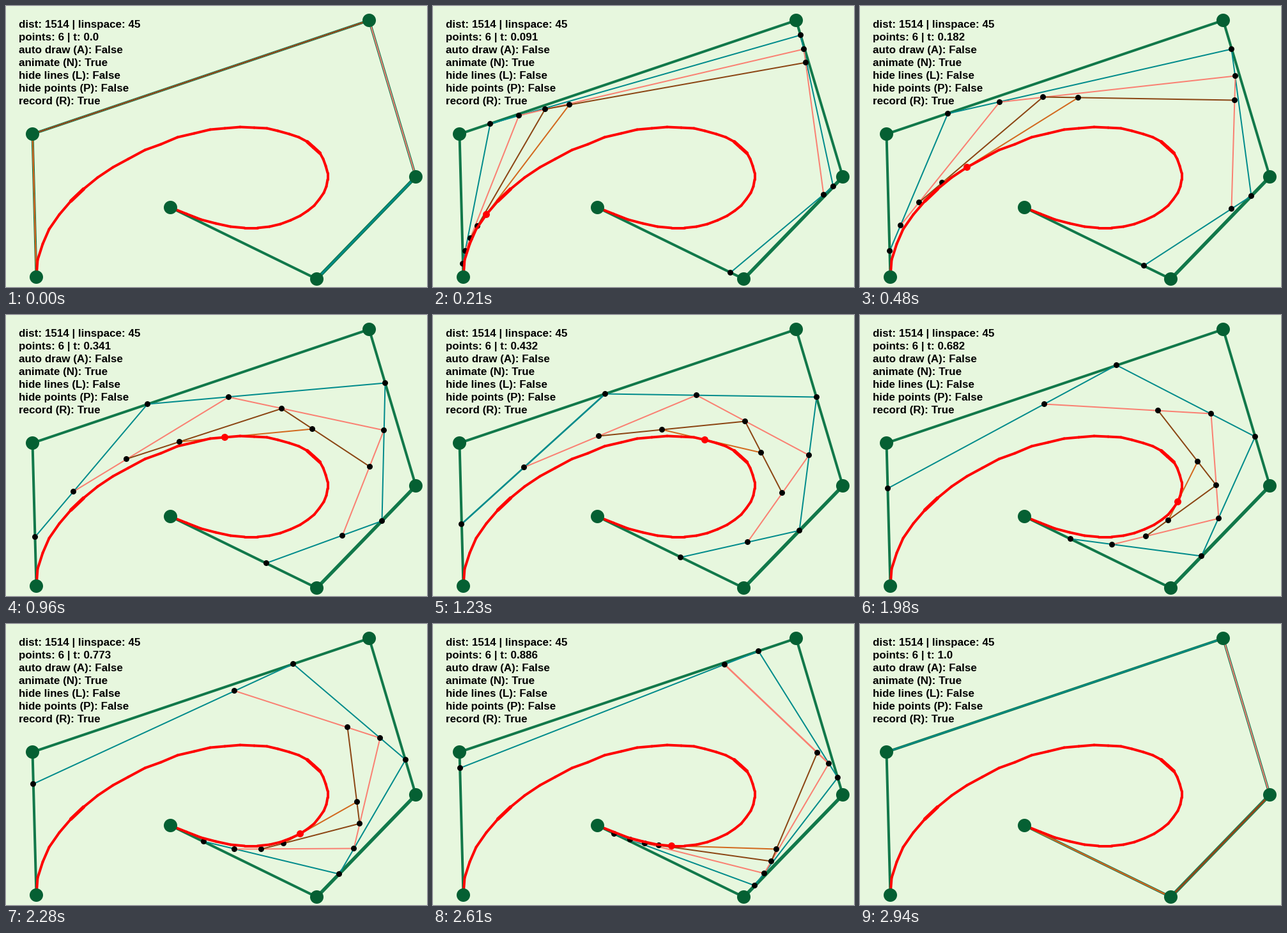
Animation of 659x440 px, one loop 3.03 s. Source, as a matplotlib script:

```python
import matplotlib.pyplot as plt
from matplotlib.animation import FuncAnimation
from matplotlib.collections import LineCollection
from matplotlib.patches import Circle

W, H, DPI = 659, 440, 64
PX = 72 / DPI                      # one pixel in points
STEPS = 44
TICKS, TICK_MS = 101, 30

BACK = "#e7f7de"
FRAME_GREEN = "#11784a"
DOT_GREEN = "#056033"
LEVEL_COLORS = ["darkcyan", "salmon", "saddlebrown", "chocolate"]

CONTROL = [(47, 424), (41, 200), (568, 22), (641, 267), (486, 427), (257, 315)]

INFO = """dist: 1514 | linspace: 45
points: 6 | t: {}
auto draw (A): False
animate (N): True
hide lines (L): False
hide points (P): False
record (R): True"""


def along(p, q, k):
    """Pixel on the raster line p-q at k / STEPS of its length."""
    dx, dy = q[0] - p[0], q[1] - p[1]
    n = max(abs(dx), abs(dy))
    if n == 0:
        return p
    i = -(-k * n // STEPS)
    return tuple((2 * (a * n + i * d) + n) // (2 * n) for a, d in zip(p, (dx, dy)))


def casteljau(k):
    """Points of every construction level, ending with the curve point."""
    levels, pts = [], CONTROL
    while len(pts) > 1:
        pts = [along(p, q, k) for p, q in zip(pts, pts[1:])]
        levels.append(pts)
    return levels


def trace(lines, pts, width):
    """Lay a polyline; near-diagonal pieces come out heavier."""
    segs = list(zip(pts, pts[1:]))
    widths = []
    for (x0, y0), (x1, y1) in segs:
        lo, hi = sorted((abs(x1 - x0), abs(y1 - y0)))
        widths.append(width * PX * (1.35 if lo > 0.88 * hi else 1))
    lines.set_segments(segs)
    lines.set_linewidths(widths)


def stroke(color, z, pts=(), width=4):
    lines = LineCollection([], colors=color, capstyle="round", zorder=z)
    ax.add_collection(lines)
    trace(lines, pts, width)
    return lines


def dot(center, color, size, z):
    return ax.add_patch(Circle(center, size / 2, color=color, lw=0, zorder=z))


fig = plt.figure(figsize=(W / DPI, H / DPI), dpi=DPI, facecolor=BACK)
ax = fig.add_axes([0, 0, 1, 1])
ax.axis("off")
ax.set_autoscale_on(False)
ax.set_xlim(-0.5, W - 0.5)
ax.set_ylim(H - 0.5, -0.5)

curve = [casteljau(k)[-1][0] for k in range(STEPS + 1)]

stroke(FRAME_GREEN, 1, CONTROL)
level_lines = [stroke(c, 2 + 0.1 * i) for i, c in enumerate(LEVEL_COLORS)]
joints = [dot(p, "black", 9, 3) for level in casteljau(0)[:-1] for p in level]
stroke("red", 4, curve)
tracer = dot(curve[0], "red", 11, 5)
for point in CONTROL:
    dot(point, DOT_GREEN, 21, 6)
rows = [ax.text(20, 33.1 + 20 * i, "", family="Liberation Sans", weight="bold",
                size=17.05 * PX, color="black", va="baseline", zorder=7)
        for i in range(INFO.count("\n") + 1)]


def draw(tick):
    k = -(-11 * tick // 25)
    levels = casteljau(k)
    for lines, pts in zip(level_lines, levels):
        trace(lines, pts, 2)
    for patch, p in zip([*joints, tracer], sum(levels, [])):
        patch.center = p
    for row, label in zip(rows, INFO.format(round(k / STEPS, 3)).split("\n")):
        row.set_text(label)
    return [*level_lines, *joints, tracer, *rows]


anim = FuncAnimation(fig, draw, frames=TICKS, interval=TICK_MS,
                     repeat=True, repeat_delay=0, blit=False)
plt.show()
```
